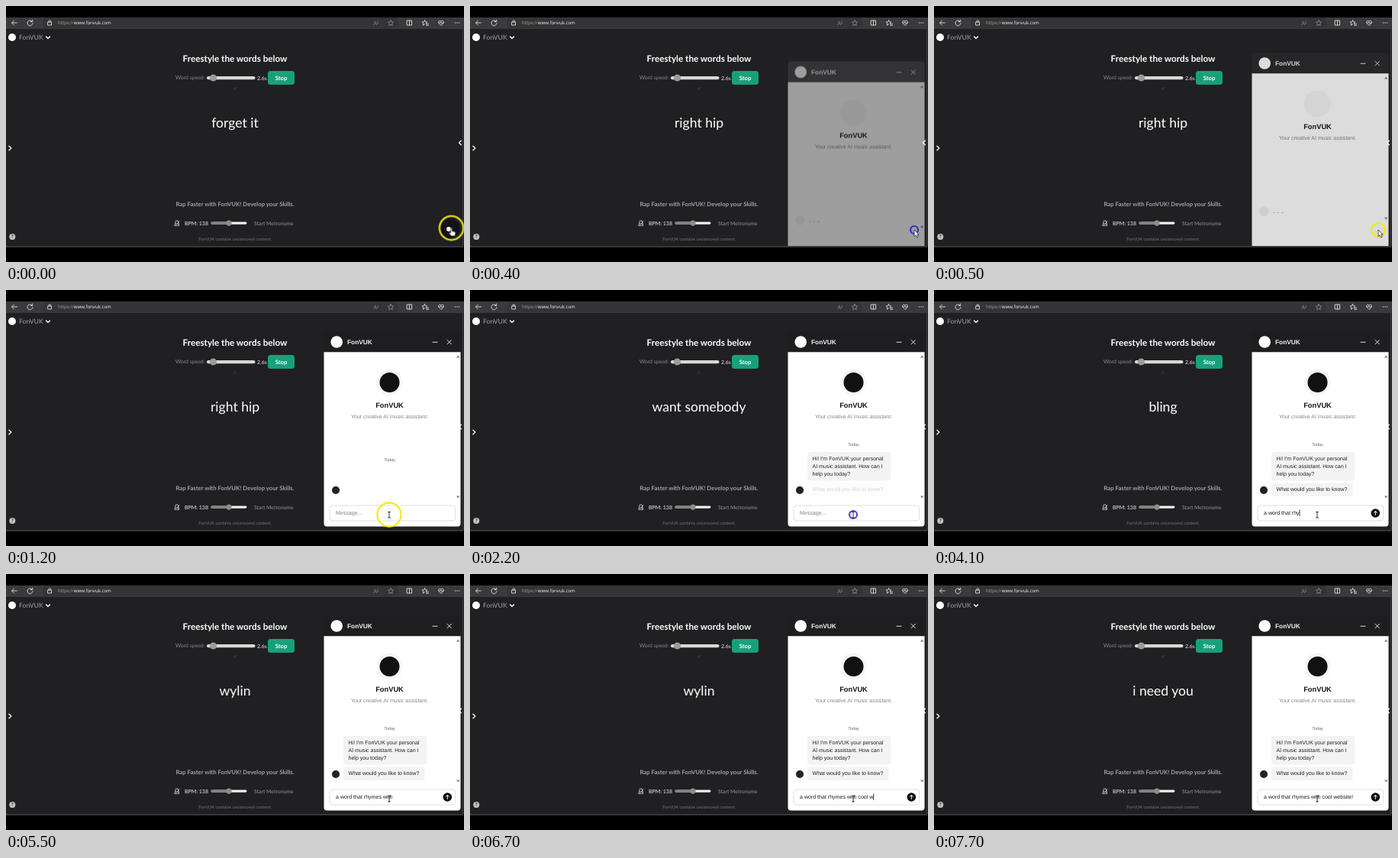
Recreate the animation shown at these times as an HTML page. Size 600 by 335 pixels, loop 8000 ms.

```html
<!DOCTYPE html>
<html lang="en">
<head>
<meta charset="utf-8">
<title>Freestyle trainer</title>
<style>
  html, body { margin: 0; width: 100%; height: 100%; overflow: hidden; background: #000; }
  svg { display: block; width: 600px; height: 335px; }
  text { font-family: Lato, sans-serif; text-rendering: geometricPrecision; white-space: pre; }
  .mid { text-anchor: middle; }
  .url { font: 6.1px "Open Sans", sans-serif; }
  .chat text { font-family: "Liberation Sans", Arial, sans-serif; font-size: 7.05px; }
  .chat .name { font-size: 8.3px; font-weight: 700; }
  .chat .big { font-size: 9.3px; }
  .chat .day { font-size: 5.5px; }
  .line { fill: none; stroke: #ddd; stroke-linecap: round; stroke-linejoin: round; }

  .anim { animation: 8s step-end infinite; }
  .chat { animation-name: open; }
  .head { animation-name: head; }
  .loaded { animation-name: loaded; }
  .dots { animation-name: dots; }
  .today { animation-name: today; }
  .thread { animation-name: thread; }
  .hi { animation-name: hi; }
  .ask { animation-name: ask; }
  .send { animation-name: send; }
  .launch, .hand { animation-name: early; }
  .arrow { animation-name: arrow; }
  .beam { animation-name: beam; }
  .pointer { animation-name: move; }
  .ring { animation-name: ring; fill: none; stroke-width: 2.2; }

  @keyframes open {
    0% { opacity: 0; transform: translateY(32px); }
    3.75% { opacity: .22; transform: translateY(27px); }
    5% { opacity: .57; transform: translateY(18.5px); }
    6.25% { opacity: .85; transform: translateY(7px); }
    7.5% { opacity: .97; transform: translateY(1.5px); }
    8.75%, 100% { opacity: 1; transform: none; }
  }
  @keyframes head { 0% { fill: #444446; } 6.25% { fill: #28282a; } 7.5%, 100% { fill: #1e1d1f; } }
  @keyframes loaded { 0% { opacity: 0; } 7.5% { opacity: .6; } 8.75%, 100% { opacity: 1; } }
  @keyframes dots { 0% { opacity: 1; } 12.5%, 100% { opacity: 0; } }
  @keyframes today { 0% { opacity: 0; } 12.5%, 100% { opacity: 1; } }
  @keyframes thread { 0% { transform: translateY(20.5px); } 25%, 100% { transform: none; } }
  @keyframes hi { 0% { opacity: 0; } 21.25% { opacity: .4; } 22.5%, 100% { opacity: 1; } }
  @keyframes ask {
    0% { opacity: 0; } 25% { opacity: .05; } 27.5% { opacity: .2; } 28.75% { opacity: .5; }
    30% { opacity: .8; } 31.25%, 100% { opacity: 1; }
  }
  @keyframes send { 0% { opacity: 0; } 40%, 100% { opacity: 1; } }
  @keyframes early { 0% { opacity: 1; } 3.75%, 100% { opacity: 0; } }
  @keyframes arrow { 0% { opacity: 0; } 3.75% { opacity: 1; } 15%, 100% { opacity: 0; } }
  @keyframes beam { 0% { opacity: 0; } 15%, 100% { opacity: 1; } }
  @keyframes move {
    0% { transform: translate(583.5px, 290.5px); }
    2.5% { transform: translate(582px, 293px); }
    11.25% { transform: translate(573px, 294px); }
    12.5% { transform: translate(552px, 294px); }
    13.75% { transform: translate(520px, 294px); }
    15%, 100% { transform: translate(502px, 294px); }
  }
  @keyframes ring {
    0% { r: 15.6px; stroke: #f2ea1c; opacity: 1; }
    1.25% { r: 12px; stroke: #f2ea1c; }
    2.5% { r: 8px; stroke: #f2ea1c; }
    3.75% { r: 5px; stroke: #2c30d2; }
    6.25% { r: 9px; stroke: #f2ea1c; }
    7.5% { r: 13px; stroke: #f2ea1c; }
    8.75% { r: 15.6px; stroke: #f2ea1c; }
    25% { r: 12px; stroke: #f2ea1c; }
    26.25% { r: 8px; stroke: #f2ea1c; }
    27.5% { r: 5px; stroke: #4f46d4; }
    28.75% { r: 9px; stroke: #f2ea1c; }
    30% { r: 13px; stroke: #f2ea1c; }
    31.25% { r: 15.6px; stroke: #f2ea1c; opacity: 1; }
    32.5% { r: 15.6px; stroke: #f2ea1c; opacity: .65; }
    33.75% { r: 15.6px; stroke: #f2ea1c; opacity: .3; }
    35%, 100% { r: 15.6px; stroke: #f2ea1c; opacity: 0; }
  }
</style>
</head>
<body>
<svg viewBox="0 0 600 335">
  <rect width="600" height="335" fill="#000"/>
  <rect y="30" width="600" height="286" fill="#201f21"/>
  <rect x="598" y="30" width="1.200" height="285" fill="#3c3b3d"/>

  <!-- browser bar -->
  <rect y="15" width="600" height="15" fill="#3a3a3c"/>
  <rect x="48" y="15.500" width="466" height="13.500" rx="6.500" fill="#343436"/>
  <g class="line" stroke-width=".9">
    <path d="M14.500 22H7.500M10.500 19L7.500 22L10.500 25"/>
    <path d="M34.300 20.200A3.500 3.500 0 1 0 35 22.500M34.700 18V20.500H32.200"/>
    <path d="M55 21h4.500v4H55zM56 21v-1a1.250 1.250 0 0 1 2.500 0v1"/>
    <path d="M525.500 19h6v6h-6zM528.500 19v6"/>
    <path d="M548.500 18.500l1 2.300 2.500.2-1.900 1.700M548.500 18.500l-1 2.300-2.500.2 1.900 1.700-.6 2.500 2.200-1.300M550.500 23.500h3M550.500 25.300h3"/>
    <path d="M570 25.300l-3-3c-1.600-2 1.400-4.300 3-2.200 1.600-2.100 4.600.2 3 2.200zM567 22h1.800l1-1.300 1 2.200.7-.9h1.800"/>
    <path d="M504 18.500l1.100 2.400 2.600.3-1.900 1.800.5 2.600-2.300-1.300-2.300 1.300.5-2.600-1.900-1.800 2.600-.3z" stroke="#888"/>
  </g>
  <g fill="#ddd"><circle cx="588.500" cy="22" r=".7"/><circle cx="591" cy="22" r=".7"/><circle cx="593.500" cy="22" r=".7"/></g>
  <text class="url" x="481.500" y="24.800" fill="#999" style="font-size:7px">A<tspan dy="-2" font-size="4">))</tspan></text>
  <text class="url" x="68" y="24.300" fill="#a5a5a5">https://<tspan fill="#f4f4f4">www.fonvuk.com</tspan></text>

  <!-- page -->
  <circle cx="8" cy="41" r="5" fill="#fff"/>
  <text x="17" y="44.200" font-size="8.700" fill="#a0a0a0">FonVUK</text>
  <g class="line" stroke-width="1.500" style="stroke:#f2f2f2">
    <path d="M52.500 40L55 42.500L57.500 40"/>
    <path d="M4 183.300L6.800 186L4 188.700"/>
    <path d="M596.300 176.300L593.500 179L596.300 181.700"/>
  </g>
  <text class="mid" x="300" y="73" font-size="11.700" font-weight="700" fill="#fff">Freestyle the words below</text>
  <text x="222" y="96.300" font-size="6.900" fill="#8c8c8c">Word speed:</text>
  <rect x="263" y="92" width="63.500" height="4.300" rx="2.100" fill="#d8d8d8"/>
  <circle cx="271.500" cy="94" r="4.500" fill="#9b9b9b"/>
  <text x="329" y="96.500" font-size="7" fill="#e8e8e8">2.6s</text>
  <rect x="343" y="85" width="35" height="18" rx="3.500" fill="#18a07b"/>
  <text class="mid" x="360.500" y="96.700" font-size="7.600" font-weight="700" fill="#fff">Stop</text>
  <circle cx="300" cy="108" r="2.300" fill="#2d2b2d"/>
  <text id="word" class="mid" x="300" y="159" font-size="17.600" fill="#fff"></text>
  <text class="mid" x="300" y="261.500" font-size="7.760" font-weight="700" fill="#a3a3a3">Rap Faster with FonVUK! Develop your Skills.</text>
  <path class="line" stroke-width=".8" d="M221.200 287.300h5.600l-1.700-6.300h-2.200zM222 285.200h4M224 285L227.300 281.800"/>
  <text x="234" y="286.500" font-size="7" fill="#f0f0f0">BPM: 138</text>
  <rect x="268.500" y="282.400" width="47" height="3.400" rx="1.700" fill="#eee"/>
  <rect x="268.500" y="282.400" width="24" height="3.400" rx="1.700" fill="#808080"/>
  <circle cx="292" cy="284.100" r="3.600" fill="#8e8e8e"/>
  <text x="325" y="286.500" font-size="6.850" fill="#9a9a9a">Start Metronome</text>
  <text class="mid" x="300" y="306.700" font-size="5.700" fill="#777">FonVUK contains uncensored content.</text>
  <circle cx="8.300" cy="302" r="4" fill="#c4c4c4"/>
  <text class="mid" x="8.300" y="304.400" font-size="6.500" font-weight="700" fill="#201f21">?</text>
  <g class="anim launch"><circle cx="581.500" cy="291" r="12.500" fill="#121113"/><circle cx="580" cy="292" r="3" fill="#fff"/></g>

  <!-- chat panel -->
  <g class="anim chat">
    <path d="M416.500 81h179v224.500a4 4 0 0 1-4 4h-171a4 4 0 0 1-4-4z" fill="#fff"/>
    <path class="anim head" d="M416.500 81.200V58a4 4 0 0 1 4-4h171a4 4 0 0 1 4 4v23.200z"/>
    <circle cx="433.200" cy="68" r="7.800" fill="#fff"/>
    <text class="name" x="447" y="71" fill="#f4f4f4">FonVUK</text>
    <path class="line" d="M559 68.300h6M578 65.500l5.400 5.400M583.400 65.500l-5.400 5.400"/>
    <path d="M590 88.500h4.400l-2.200-3.300zM590 269.500h4.400l-2.200 3.300z" fill="#858585"/>
    <circle cx="502.300" cy="121" r="17.500" fill="#f6f6f6"/>
    <text class="name big mid" x="502.500" y="154.300" fill="#111">FonVUK</text>
    <text class="mid" x="502.500" y="167.800" fill="#858585">Your creative AI music assistant.</text>
    <circle cx="432.300" cy="262" r="6" fill="#efefef"/>
    <path class="anim dots" d="M444 263.500h3M449.500 263.500h3M455 263.500h3" stroke="#ccc" stroke-width="1.200"/>
    <g class="anim thread">
      <text class="anim today day mid" x="502.500" y="203.500" fill="#666">Today</text>
      <g class="anim hi">
        <rect x="442" y="212" width="109.500" height="37.500" rx="4" fill="#f3f3f3"/>
        <g fill="#222">
          <text x="448.500" y="223.300">Hi! I'm FonVUK your personal</text>
          <text x="448.500" y="232.900">AI music assistant. How can I</text>
          <text x="448.500" y="242.500">help you today?</text>
        </g>
      </g>
    </g>
    <g class="anim ask">
      <rect x="442" y="252.500" width="106.500" height="17.500" rx="4" fill="#f3f3f3"/>
      <text x="448.500" y="263.300" fill="#222">What would you like to know?</text>
    </g>
    <g class="anim loaded">
      <circle cx="502.500" cy="121" r="13" fill="#111"/>
      <circle cx="432" cy="262" r="5" fill="#222"/>
      <rect x="424" y="282" width="164.500" height="20" rx="3.500" fill="#fff" stroke="#dcdcdc" stroke-width=".9"/>
      <text id="hint" x="432" y="294" fill="#858585">Message...</text>
      <text id="typed" x="432" y="294" fill="#1c1c1c"></text>
      <rect id="caret" y="287.500" width=".8" height="8.500" fill="#111"/>
      <g class="anim send">
        <circle cx="578.300" cy="292" r="5.800" fill="#0d0d0d"/>
        <path class="line" style="stroke:#fff" d="M578.300 294.500v-5M576.300 291.400l2-2 2 2"/>
      </g>
    </g>
  </g>
  <rect y="314" width="600" height="21" fill="#000"/>
  <rect y="314" width="599" height="1.800" fill="#3c3b3d"/>

  <!-- mouse -->
  <g class="anim pointer">
    <circle class="anim ring"/>
    <path class="anim hand" fill="#fff" stroke="#111" stroke-width=".7" d="M-1 0.500q1-1.500 2 0v3.500l3.500 1q1 .4.800 1.500l-.6 4h-5l-3-4q.2-1.500 2.300 0z"/>
    <path class="anim arrow" fill="#fff" stroke="#111" stroke-width=".7" d="M0 0v8.500l2-1.700 1.500 3.200 1.700-.8-1.500-3.200h2.600z"/>
    <path class="anim beam" fill="none" stroke="#222" stroke-width=".9" d="M-1.800 -3.500h3.600M0 -3.500v7.500M-1.800 4h3.600"/>
  </g>
</svg>
<script>
  const LOOP = 8000;
  const WORDS = [[0, "forget it"], [400, "right hip"], [1700, "want somebody"], [3000, "bling"],
    [4300, "keep moving"], [5500, "wylin"], [6800, "i need you"]];
  const PHRASE = "a word that rhymes with cool website!";
  // [time, letters typed so far]
  const TYPING = [[0, 0], [3100, 0], [4100, 15], [4700, 24], [5700, 24], [6100, 28],
    [6500, 28], [7300, 36], [7400, 36], [7500, 37], [LOOP, 37]];
  const BLINKS = [1500, 2000, 2500, 3000, 3200, 5000, 5200, 5500, 5800, 6400, 6600, 7700];

  const [word, hint, typed, caret] = ["word", "hint", "typed", "caret"].map(id => document.getElementById(id));

  function lettersAt(t) {
    const i = TYPING.findIndex(([time]) => time > t);
    const [t0, n0] = TYPING[i - 1], [t1, n1] = TYPING[i];
    return Math.floor(n0 + (n1 - n0) * (t - t0) / (t1 - t0) + 1e-6);
  }

  function setText(el, s) {
    if (el.textContent !== s) el.textContent = s;
  }

  function draw(ms) {
    const t = Math.floor(ms % LOOP / 100) * 100;
    setText(word, WORDS.filter(([time]) => time <= t).pop()[1]);
    const n = lettersAt(t);
    setText(typed, PHRASE.slice(0, n));
    hint.style.opacity = n ? 0 : 1;
    caret.setAttribute("x", 432 + (n ? typed.getComputedTextLength() : 0));
    caret.style.opacity = BLINKS.filter(time => time <= t).length % 2;
  }

  let start;
  function tick(now) {
    start ??= now;
    draw(now - start);
    requestAnimationFrame(tick);
  }
  draw(0);
  requestAnimationFrame(tick);
</script>
</body>
</html>
```
